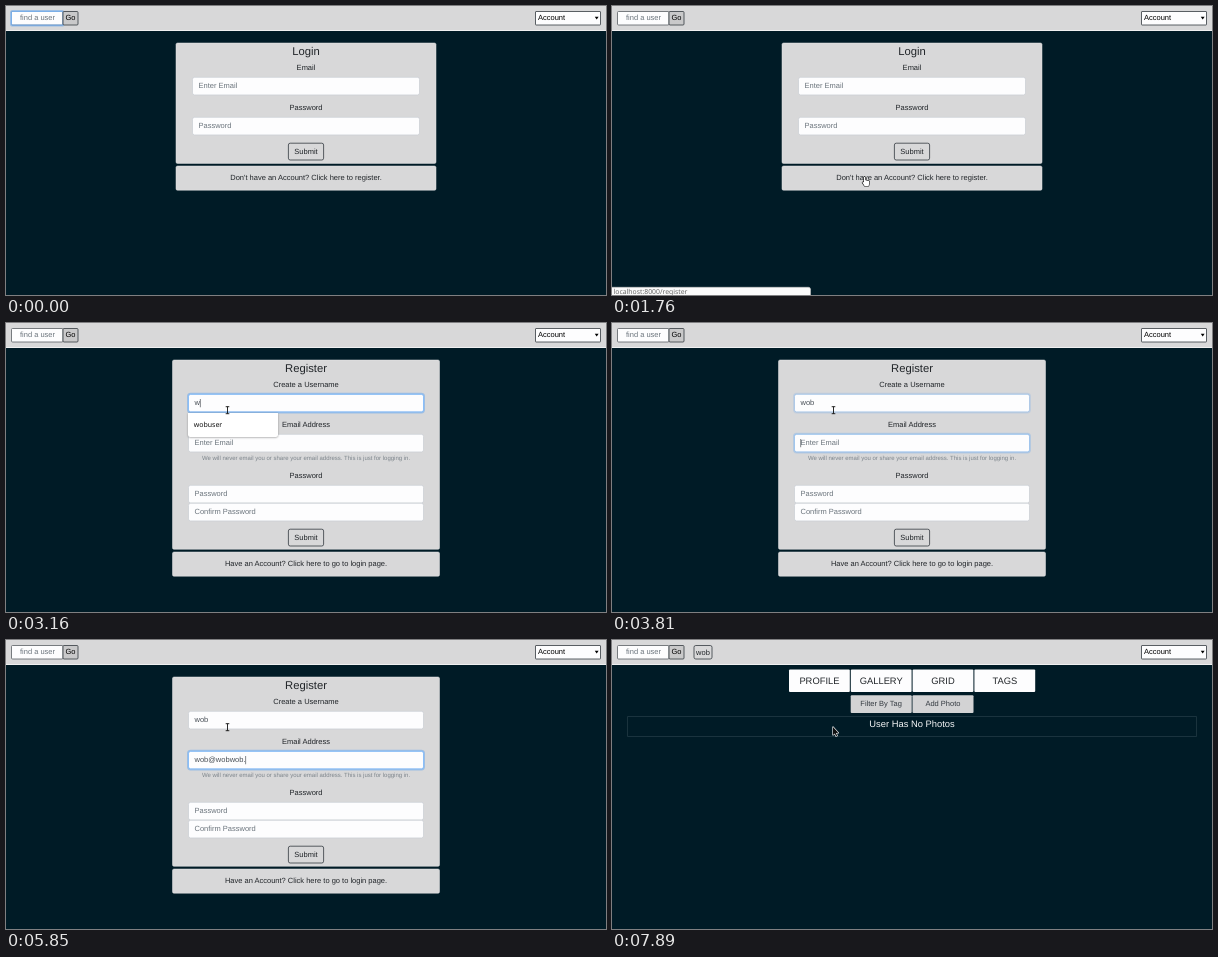
These frames come from a looping animation (600x289 px, 7990 ms). An HTML page with a canvas:

```html
<!DOCTYPE html>
<html lang="en">
<head>
<meta charset="utf-8">
<title>Register</title>
<style>
html, body { margin: 0; width: 100%; height: 100%; overflow: hidden; background: #001b26; }
canvas { display: block; width: 100vw; height: 100vh; }
</style>
</head>
<body>
<canvas id="stage"></canvas>
<script>
const W = 600, H = 289, LOOP = 7990;
const REGISTER_AT = 1900, HOME_AT = 7890;
const SANS = '"Liberation Sans", Arial, sans-serif';
const UI = '"Noto Sans", "Open Sans", sans-serif';
const INK = '#212529', PANEL = '#d8d8d9', MUTED = '#6c757d';
const USER = 'wob';

const canvas = document.getElementById('stage');
const ctx = canvas.getContext('2d');

const fields = [
  { y: 71, hint: 'Enter Username', value: USER, from: 2790, to: 3720, keys: [3060, 3440, 3530] },
  { y: 111, hint: 'Enter Email', value: 'wob@wobwob.test', from: 3720, to: 6310,
    keys: [3900, 4000, 4090, 4740, 5010, 5110, 5200, 5570, 5660, 5750, 5840, 5930, 6030, 6120, 6210] },
  { y: 162, hint: 'Password', value: '•••', from: 6310, to: 6970, keys: [6590, 6690, 6780] },
  { y: 180, hint: 'Confirm Password', value: '•••', from: 6970, to: HOME_AT, keys: [7240, 7330, 7430], caretEnd: 7700 }
];

const menus = [
  { from: 3060, to: 3720, y: 90, items: ['wobuser'] },
  { from: 3900, to: 4740, y: 130, items: ['wob@wob.test', 'wobuser@wob.test'] },
  { from: 4740, to: 5570, y: 130, items: ['wob@wob.test'] }
];

// time, x, y of the pointer tip
const path = [
  [150, 560, 25], [840, 415, 155], [1300, 252, 171], [1760, 252, 171],
  [2140, 220, 98], [2420, 220, 98], [2700, 221, 87]
];

const clamp = v => Math.max(0, Math.min(1, v));
const ease = p => p * p * (3 - 2 * p);

function text(str, x, y, { size = 7.5, color = INK, align = 'center', font = SANS, weight = 400 } = {}) {
  ctx.font = `${weight} ${size}px ${font}`;
  ctx.textAlign = align;
  ctx.fillStyle = color;
  ctx.fillText(str, x, y);
}

function box(x, y, w, h, fill, stroke, r = 0, line = 0.8) {
  ctx.beginPath();
  ctx.roundRect(x, y, w, h, r);
  if (fill) { ctx.fillStyle = fill; ctx.fill(); }
  if (stroke) { ctx.strokeStyle = stroke; ctx.lineWidth = line; ctx.stroke(); }
}

function button(label, x, y, w, h, fill = PANEL) {
  box(x, y, w, h, fill, '#343a40', 1.8);
  text(label, x + w / 2, y + h / 2 + 0.2);
}

function ring(x, y, w, h, alpha, r) {
  if (alpha <= 0) return;
  ctx.globalAlpha = alpha;
  box(x - 0.7, y - 0.7, w + 1.4, h + 1.4, null, 'rgba(0,123,255,.28)', r + 0.8, 1.6);
  box(x, y, w, h, null, '#80bdff', r, 0.8);
  ctx.globalAlpha = 1;
}

function input(x, y, w, str, hint, focus = 0) {
  box(x, y + 0.3, w, 17.6, '#fdfdfe', '#c3c8ce', 2, 0.6);
  ring(x, y + 0.3, w, 17.6, focus, 2);
  text(str || hint, x + 6, y + 9, { align: 'left', color: str ? '#495057' : MUTED });
}

function header(t) {
  box(0, 0, W, 24.3, PANEL);
  box(0, 24.1, W, 0.8, '#f0f0f1');
  const glow = 1 - clamp((t - 1600) / 150);
  box(5.5, 5.5, 51.5, 13.5, '#fdfdfe', '#5a5f64', 1);
  ring(5.5, 5.5, 51.5, 13.5, glow, 1);
  text('find a user', 14, 12, { align: 'left', color: MUTED });
  box(57, 5.5, 15, 13.5, '#c9c9ca', '#343a40', 1);
  text('Go', 64.5, 12.2, { color: '#000' });
  box(529.5, 5.5, 65, 13.5, '#fdfdfe', '#343a40', 0.5);
  text('Account', 532, 12.2, { align: 'left', color: '#000' });
  ctx.beginPath();
  ctx.moveTo(588.8, 10.8);
  ctx.lineTo(592.6, 10.8);
  ctx.lineTo(590.7, 13.6);
  ctx.fillStyle = '#000';
  ctx.fill();
}

function card(x, y, w, h) {
  box(x, y, w, h, PANEL, '#e6e6e7', 1.5, 0.5);
}

function login(t) {
  card(170, 37, 260, 120.4);
  card(170, 160, 260, 24.2);
  text('Login', 300, 45.6, { size: 11.25 });
  text('Email', 300, 62);
  input(186.5, 71, 227, '', 'Enter Email');
  text('Password', 300, 102);
  input(186.5, 111, 227, '', 'Password');
  button('Submit', 282.4, 137.2, 35.2, 16.8);
  text("Don't have an Account? Click here to register.", 300, 172);
  const bar = clamp((t - 1200) / 150);
  if (bar) {
    ctx.globalAlpha = bar;
    box(-3, 281.3, 201.5, 12, '#fbfbfb', '#c8c8c8', 2, 0.6);
    text('localhost:8000/register', 1.5, 286, { size: 6.85, align: 'left', color: '#666', font: UI });
    ctx.globalAlpha = 1;
  }
}

function drawField(f, t) {
  const count = f.keys.filter(k => k <= t).length;
  const value = f.value.slice(0, count);
  const focus = clamp((t - f.from) / 150) * (1 - clamp((t - f.to) / 150));
  input(182.5, f.y, 235, value, f.hint, focus);
  if (t < f.from || t >= f.to || t > (f.caretEnd || LOOP)) return;
  const last = count ? f.keys[count - 1] : f.from;
  if (!f.caretEnd && (t - last) % 1000 >= 500) return;
  ctx.font = `7.5px ${SANS}`;
  box(188.5 + ctx.measureText(value).width, f.y + 5, 0.6, 8.2, '#30363c');
}

function menu({ y, items }) {
  ctx.save();
  ctx.shadowColor = 'rgba(0,0,0,.4)';
  ctx.shadowBlur = 2 * canvas.width / W;
  ctx.shadowOffsetY = 0.6 * canvas.width / W;
  box(182, y, 90, 7 + 17 * items.length, '#fff', null, [0, 0, 2, 2]);
  ctx.restore();
  items.forEach((item, i) =>
    text(item, 187.7, y + 12 + 17 * i, { size: 7, align: 'left', color: '#111', font: UI, weight: 500 }));
}

function register(t) {
  card(166.5, 37, 267, 189.3);
  card(166.5, 229, 267, 24.2);
  text('Register', 300, 45.6, { size: 11.25 });
  text('Create a Username', 300, 62);
  text('Email Address', 300, 102);
  text('We will never email you or share your email address. This is just for logging in.', 300, 135.6,
    { size: 6, color: '#7c848b' });
  text('Password', 300, 153);
  fields.forEach(f => drawField(f, t));
  button('Submit', 282.4, 206.2, 35.2, 16.8);
  text('Have an Account? Click here to go to login page.', 300, 240.8);
  menus.filter(m => t >= m.from && t < m.to).forEach(menu);
}

function home() {
  button(USER, 82, 5.5, 18, 13.5);
  ['PROFILE', 'GALLERY', 'GRID', 'TAGS'].forEach((label, i) => {
    const x = 177 + 61.8 * i;
    box(x, 29.5, 60.8, 22.5, '#fdfdfe', null, 1);
    text(label, x + 30.4, 41, { size: 9.375 });
  });
  ['Filter By Tag', 'Add Photo'].forEach((label, i) => {
    const x = 238.7 + 61.8 * i;
    box(x, 55.3, 61, 17.8, '#d3d3d4', null, 1);
    text(label, x + 30.4, 64.2, { color: '#343a40' });
  });
  box(15.5, 76.5, 569, 20, null, '#213a45', 0, 0.8);
  text('User Has No Photos', 300, 84.7, { size: 9.375, color: '#f4f6f7' });
}

function outline(points, fill, stroke) {
  ctx.beginPath();
  points.forEach(([x, y]) => ctx.lineTo(x, y));
  ctx.closePath();
  ctx.lineJoin = 'round';
  ctx.lineWidth = 1.2;
  ctx.strokeStyle = stroke;
  ctx.stroke();
  ctx.fillStyle = fill;
  ctx.fill();
}

function pointer(t) {
  if (t < path[0][0]) return;
  let i = 0;
  while (i < path.length - 2 && t >= path[i + 1][0]) i++;
  const [t0, x0, y0] = path[i], [t1, x1, y1] = path[i + 1];
  const p = ease(clamp((t - t0) / (t1 - t0)));
  const x = x0 + (x1 - x0) * p, y = y0 + (y1 - y0) * p;
  const overLink = t < REGISTER_AT && y > 160 && x < 376;
  const overField = t >= 2420 && t < HOME_AT && y < 89.5;
  ctx.save();
  ctx.translate(x, y);
  if (overField) {
    ctx.lineWidth = 0.9;
    ctx.strokeStyle = '#111';
    ctx.beginPath();
    ctx.moveTo(-1.3, -3.3); ctx.lineTo(2.3, -3.3);
    ctx.moveTo(0.5, -3.3); ctx.lineTo(0.5, 3.7);
    ctx.moveTo(-1.3, 3.7); ctx.lineTo(2.3, 3.7);
    ctx.stroke();
  } else if (overLink) {
    outline([[0, 0], [1.2, 0], [1.4, 3.2], [5, 4], [5.4, 5.2], [4.6, 9], [0.6, 9], [-1.6, 5.6], [-0.8, 4.8], [0, 5.6]],
      '#fff', '#111');
  } else {
    outline([[0, 0], [0, 8], [1.8, 6.4], [3, 9.2], [4.2, 8.7], [3, 6], [5.4, 5.8]], '#111', '#fff');
  }
  ctx.restore();
}

function draw(t) {
  const w = Math.round(innerWidth * devicePixelRatio), h = Math.round(innerHeight * devicePixelRatio);
  if (canvas.width !== w || canvas.height !== h) {
    canvas.width = w;
    canvas.height = h;
  }
  ctx.setTransform(w / W, 0, 0, h / H, 0, 0);
  ctx.textBaseline = 'middle';
  ctx.textRendering = 'geometricPrecision';
  box(0, 0, W, H, '#001b26');
  header(t);
  if (t < REGISTER_AT) login(t);
  else if (t < HOME_AT) register(t);
  else home();
  pointer(t);
}

let start;
function tick(now) {
  start ??= now;
  draw((now - start) % LOOP);
  requestAnimationFrame(tick);
}
draw(0);
requestAnimationFrame(tick);
</script>
</body>
</html>
```
